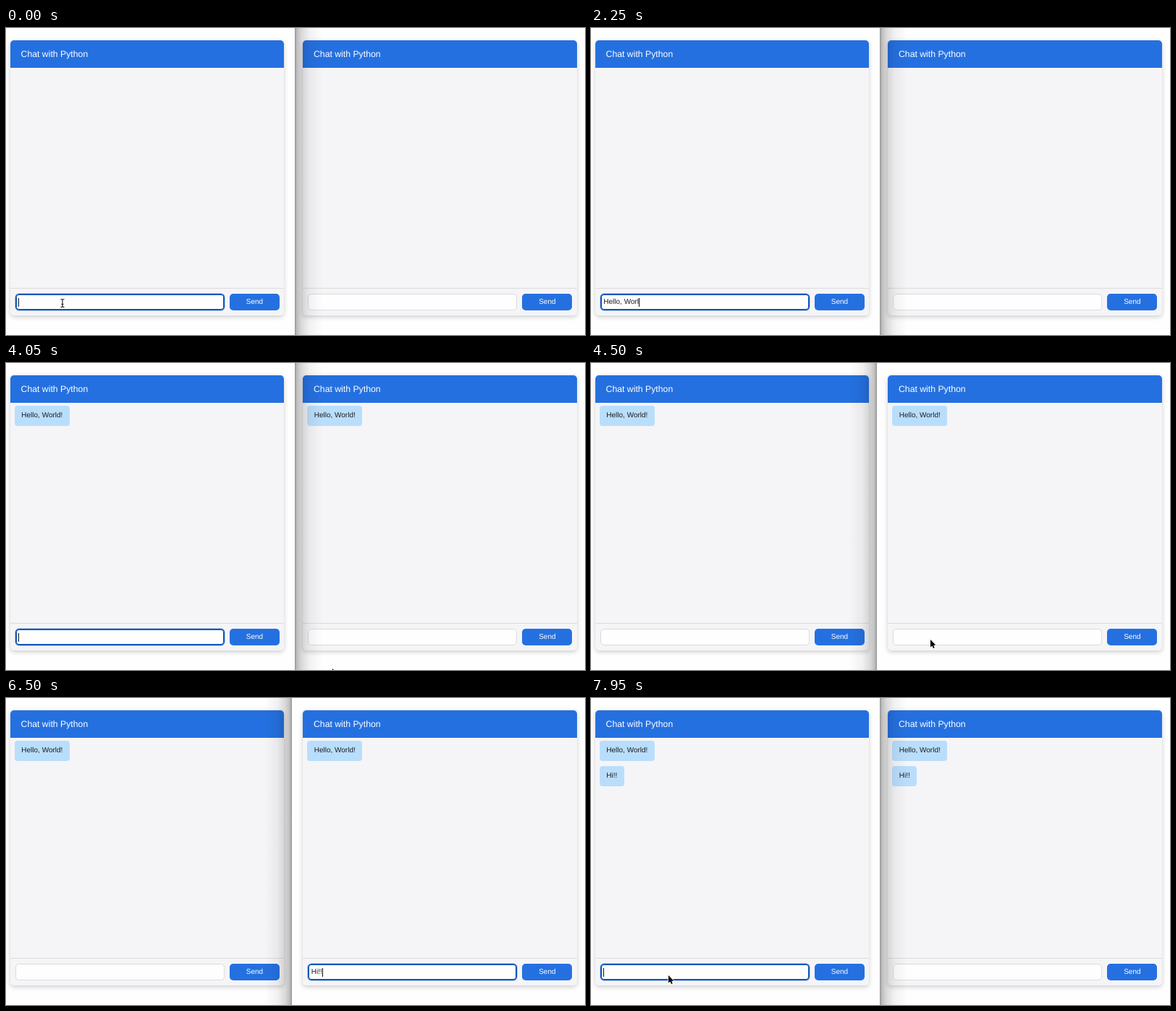
An HTML page for the animation above (8 s loop, 800 by 424 pixels).

```html
<!DOCTYPE html>
<html lang="en">
<head>
<meta charset="utf-8">
<title>Two chat windows</title>
<style>
  html, body { margin: 0; width: 100%; height: 100%; overflow: hidden; background: #fff; }
  #stage {
    position: relative; width: 800px; height: 424px; overflow: hidden;
    font: 10px "Liberation Sans", Arial, sans-serif;
    text-rendering: geometricPrecision; color: #1c1c1e; white-space: pre;
  }
  #stage * { position: absolute; box-sizing: border-box; }
  .win { top: 0; height: 424px; z-index: 1; }
  .win.active { z-index: 2; }
  .page { inset: 0; overflow: hidden; background: #fefefe; }
  .left { left: 0; width: 399px; --x: 6px; }
  .right { left: 395px; width: 405px; --x: 15.4px; }
  .shade {
    top: 0; height: 424px; width: 38px; display: none;
    background: linear-gradient(var(--dir), rgba(0,0,0,.42), rgba(0,0,0,.25) 3px,
      rgba(0,0,0,.15) 9px, rgba(0,0,0,.05) 20px, transparent);
  }
  .active .shade { display: block; }
  .left .shade { left: 100%; --dir: to right; }
  .right .shade { right: 100%; --dir: to left; }
  .panel {
    left: var(--x); top: 17px; width: 378.4px; height: 380px;
    border-radius: 5px; background: #f5f5f8; box-shadow: 0 2px 6px rgba(0,0,0,.2);
  }
  .head {
    left: 0; top: 0; width: 100%; height: 38px; padding-left: 14.6px;
    border-radius: 5px 5px 0 0; background: #2570e0; color: #fff;
    font-size: 12.25px; line-height: 38px;
  }
  .rule { left: 0; top: 342px; width: 100%; height: 1px; background: #dcdcdf; }
  .bubble {
    left: 6px; height: 28px; padding: 0 9.3px; line-height: 28px;
    border-radius: 4px; background: #b9defc;
  }
  .field {
    left: 7px; top: 350px; width: 289px; height: 23px;
    border: 1px solid #dbdbde; border-radius: 5px; background: #fefefe;
  }
  .field.focus { border-color: #1056b8; box-shadow: inset 0 0 0 1px #1056b8, 0 0 0 .5px #6f9ad6; }
  .typed { left: 3.3px; top: 0; line-height: 22px; }
  .caret { left: 100%; top: 5px; width: 1px; height: 12px; background: #111; }
  .send {
    left: 303px; top: 350px; width: 69px; height: 23px; border-radius: 5px;
    background: #2570e0; color: #fff; line-height: 23px; text-align: center;
  }
  #cursor { left: 0; top: 0; width: 800px; height: 424px; z-index: 3; }
  #cursor path { stroke-linejoin: round; paint-order: stroke; }
</style>
</head>
<body>
<div id="stage">
  <svg id="cursor" viewBox="0 0 800 424">
    <g id="pointer">
      <path id="arrow" d="M0 0V10.6L2.4 8.4 4 12 5.7 11.2 4.2 7.7H7.4Z" fill="#000" stroke="#fff" stroke-width="1.4"/>
      <g id="beam" fill="none">
        <path d="M-2.5-5.5Q0-5.5 0-4Q0-5.5 2.5-5.5M0-4V4M-2.5 5.5Q0 5.5 0 4Q0 5.5 2.5 5.5M-1.5 1.5H1.5" stroke="#fff" stroke-width="2.4"/>
        <path d="M-2.5-5.5Q0-5.5 0-4Q0-5.5 2.5-5.5M0-4V4M-2.5 5.5Q0 5.5 0 4Q0 5.5 2.5 5.5M-1.5 1.5H1.5" stroke="#111" stroke-width="1.1"/>
      </g>
    </g>
  </svg>
</div>
<script>
const LOOP = 8000, STEP = 50;
const stage = document.getElementById('stage');
const [pointer, arrow, beam] = ['pointer', 'arrow', 'beam'].map(id => document.getElementById(id));

function add(parent, cls, text = '') {
  const el = document.createElement('div');
  el.className = cls;
  el.textContent = text;
  return parent.appendChild(el);
}

// keys: time of each keystroke; caret: times at which the caret toggles, first on;
// focus and active: [from, to) spans; shown: when each message arrives
const sides = [
  {
    name: 'left', text: 'Hello, World!', sent: 3000,
    keys: [500, 900, 1100, 1200, 1450, 1600, 1800, 1900, 2000, 2150, 2250, 2400, 2600],
    caret: [0, 300, 500, 3100, 3650, 4150, 7800],
    focus: [[0, 4450], [7800, LOOP]], active: [[0, 4450], [7800, LOOP]],
    shown: [3000, 6950]
  },
  {
    name: 'right', text: 'Hi!!', sent: 6900,
    keys: [5550, 5850, 6100, 6450],
    caret: [5200, 6950, 7500],
    focus: [[5200, 7800]], active: [[4450, 7800]],
    shown: [3050, 6900]
  }
];

// Pointer paths: shape, end time, then [time, x, y] points
const moves = [
  ['beam', 500, [0, 78, 380]],
  ['beam', 3700, [3650, 78, 380]],
  ['arrow', 3750, [3700, 95, 402]],
  ['arrow', 5200, [4050, 451, 422], [4250, 463, 394], [4400, 469, 382]],
  ['beam', 5550, [5200, 469, 382]],
  ['beam', 7300, [7250, 467, 383]],
  ['arrow', 7350, [7300, 455, 411]],
  ['arrow', LOOP, [7550, 128, 421], [7650, 115, 395], [7750, 107, 383]]
];

const past = (times, t) => times.filter(s => s <= t).length;
const within = (spans, t) => spans.some(([a, b]) => t >= a && t < b);
const show = (el, on) => { el.style.visibility = on ? 'visible' : 'hidden'; };

for (const side of sides) {
  side.win = add(stage, 'win ' + side.name);
  const panel = add(add(side.win, 'page'), 'panel');
  add(side.win, 'shade');
  add(panel, 'head', 'Chat with Python');
  side.bubbles = sides.map((s, i) => {
    const b = add(panel, 'bubble', s.text);
    b.style.top = 42 + i * 35 + 'px';
    return b;
  });
  add(panel, 'rule');
  side.field = add(panel, 'field');
  side.typed = add(side.field, 'typed');
  side.label = document.createTextNode('');
  side.typed.append(side.label);
  side.bar = add(side.typed, 'caret');
  add(panel, 'send', 'Send');
}

function place(points, t) {
  const i = past(points.map(p => p[0]), t) - 1;
  const a = points[i], b = points[i + 1] || a;
  const k = a === b ? 0 : (t - a[0]) / (b[0] - a[0]);
  return [a[1] + (b[1] - a[1]) * k, a[2] + (b[2] - a[2]) * k];
}

function draw(t) {
  for (const s of sides) {
    const focus = within(s.focus, t);
    s.win.classList.toggle('active', within(s.active, t));
    s.field.classList.toggle('focus', focus);
    s.label.data = t < s.sent ? s.text.slice(0, past(s.keys, t)) : '';
    show(s.bar, focus && past(s.caret, t) % 2 === 1);
    s.bubbles.forEach((b, i) => show(b, t >= s.shown[i]));
  }
  const move = moves.find(([, end, first]) => t >= first[0] && t < end);
  show(arrow, move && move[0] === 'arrow');
  show(beam, move && move[0] === 'beam');
  if (move) pointer.setAttribute('transform', `translate(${place(move.slice(2), t)})`);
}

const start = performance.now();
function tick() {
  const t = (performance.now() - start) % LOOP;
  draw(Math.floor(t / STEP) * STEP);
  requestAnimationFrame(tick);
}
tick();
</script>
</body>
</html>
```
